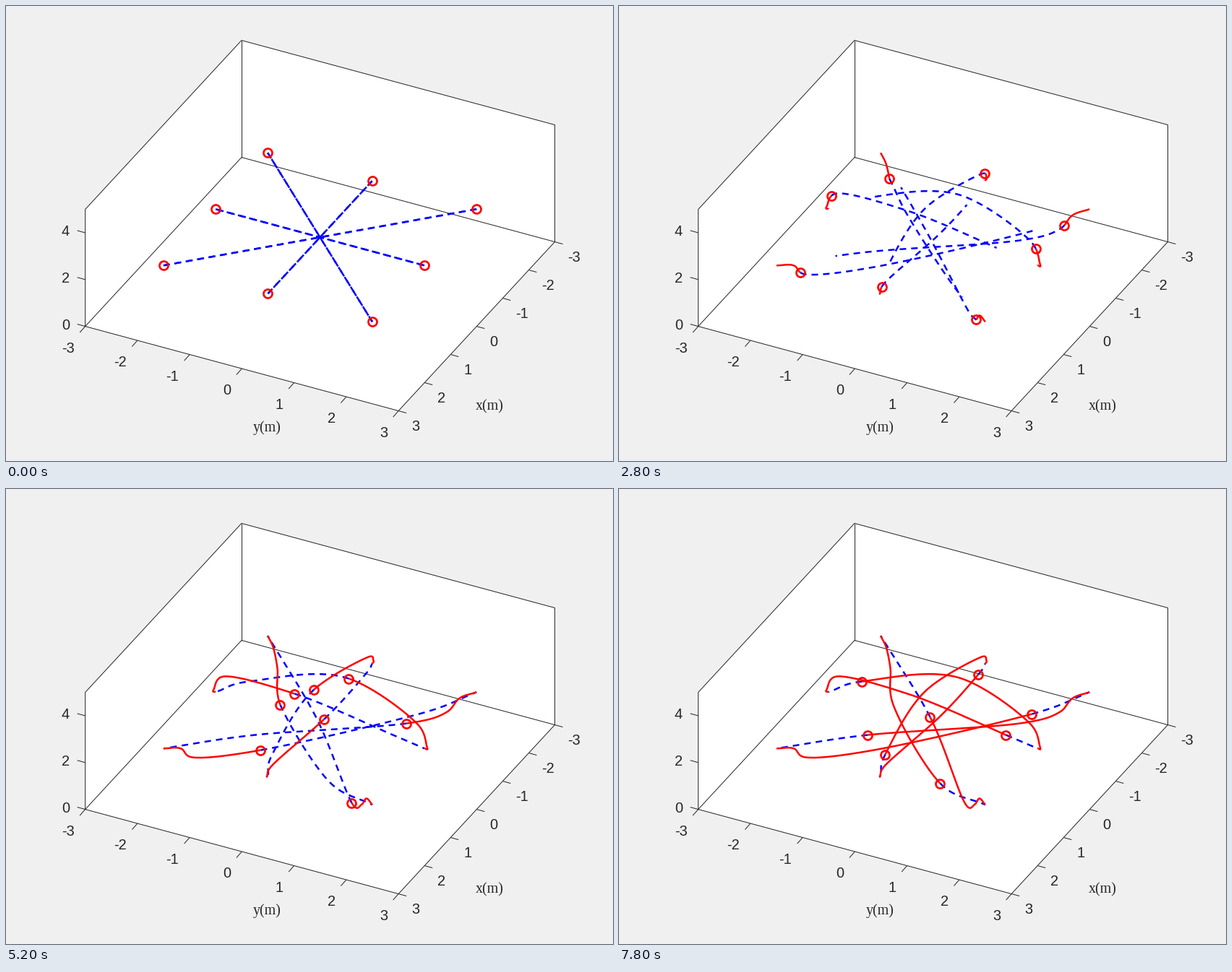
Write a matplotlib script that moves like this. It is 840x630 px and loops after 8 s.

```python
import numpy as np
import matplotlib.pyplot as plt
from matplotlib.animation import FuncAnimation

W, H, DPI = 840, 630, 100
PX = 72 / DPI                   # points per pixel
FRAMES, STEP_MS = 40, 200
TIMES = [0, 9, 16, 26, 39, 51]  # frames of start, four waypoints and goal
INK = "#262626"


def project(x, y, z):
    """Stage pixel of a point given in metres."""
    return (434.1 + 72.25 * y - 36.05 * x,
            384.5 + 19.5 * y + 39 * x - 32.4 * z)


def spline(t, pts, q):
    """Cubic Hermite curve through pts at times t, evaluated at q."""
    t, pts, q = (np.asarray(a, float) for a in (t, pts, q))
    m = np.gradient(pts, t, axis=0)
    i = np.clip(np.searchsorted(t, q, side="right") - 1, 0, len(t) - 2)
    h = (t[i + 1] - t[i])[:, None]
    s = (q - t[i])[:, None] / h
    return ((1 + 2 * s) * (1 - s) ** 2 * pts[i] + s * (1 - s) ** 2 * h * m[i]
            + s * s * (3 - 2 * s) * pts[i + 1] + s * s * (s - 1) * h * m[i + 1])


class Agent:
    """Crosses from its start to the opposite point, swerving on the way."""

    def __init__(self, x, y, settle, *waypoints):
        self.settle = settle    # frame at which the plan stops changing
        self.path = [project(x, y, 2), *waypoints, project(-x, -y, 2)]

    def at(self, q):
        return spline(TIMES, self.path, q)

    def trail(self, f):
        return self.at(np.linspace(0, f, 4 * f + 1))

    def plan(self, f):
        """Path ahead: a straight line at first, later the real course."""
        ahead = self.at(np.linspace(f, TIMES[-1], 150))
        dist = np.r_[0, np.cumsum(np.hypot(*np.diff(ahead, axis=0).T))]
        u = (dist / dist[-1])[:, None]
        straight = ahead[0] + (ahead[-1] - ahead[0]) * u
        swerve = min(1, (f / self.settle) ** 2)
        reach = 1 - 0.2 * np.sin(np.pi * min(1, f / 26))
        mix = straight + (ahead - straight) * swerve
        return mix[u[:, 0] <= reach]


agents = [
    Agent(-2, -2, 28, (370, 221), (375, 247), (379, 298), (444, 407)),
    Agent(-2, 0, 14, (508, 237), (501, 232), (426, 277), (368, 367)),
    Agent(-2, 2, 14, (626, 290), (610, 308), (554, 324), (344, 340)),
    Agent(0, 2, 14, (582, 356), (569, 325), (474, 262), (336, 266)),
    Agent(2, 2, 28, (498, 428), (492, 436), (478, 434), (430, 315)),
    Agent(2, 0, 14, (361, 396), (368, 382), (440, 318), (497, 256)),
    Agent(2, -2, 14, (242, 359), (258, 371), (352, 361), (571, 311)),
    Agent(0, -2, 14, (287, 277), (301, 259), (399, 283), (535, 340)),
]

fig = plt.figure(figsize=(W / DPI, H / DPI), dpi=DPI, facecolor="#f0f0f0")
ax = fig.add_axes([0, 0, 1, 1])
# Just off half a pixel, so that snapping never meets a tie
ax.set(xlim=(-0.45, W - 0.45), ylim=(H - 0.55, -0.55))
ax.axis("off")


def line(*pts):
    ax.plot(*zip(*pts), color=INK, lw=PX, zorder=2, solid_capstyle="butt")


def label(x, y, s, ha, font="Liberation Sans"):
    ax.text(x, y, s, ha=ha, va="baseline", family=font, size=20 * PX, color=INK)


left, front, right, back = (project(x, y, 0) for x, y in
                            [(3, -3), (3, 3), (-3, 3), (-3, -3)])
left_top, back_top, right_top = (project(x, y, 5) for x, y in
                                 [(3, -3), (-3, -3), (-3, 3)])
ax.fill(*zip(left, front, right, right_top, back_top, left_top),
        color="white", lw=0, zorder=1)
line(left, front, right, back, left, left_top, back_top, right_top, right)
line(back, back_top)

for v in range(-3, 4):
    x, y = project(3, v, 0)
    line((x, y), (x - 7.5, y + 8.5))
    label(x - 15, y + 36, str(v), "right")
    x, y = project(v, 3, 0)
    line((x, y), (x + 11, y + 3))
    label(x + 18, y + 27, str(v), "left")
for v in (0, 2, 4):
    x, y = project(3, -3, v)
    line((x, y), (x - 11, y - 3))
    label(x - 21.5, y + 4, str(v), "right")
label(668.5, 559, "x(m)", "center", "Liberation Serif")
label(361, 588, "y(m)", "center", "Liberation Serif")

LW = 2.5
plan_lines = [ax.plot([], [], color="blue", lw=LW * PX, zorder=3,
                      ls=(0, (9 / LW, 7 / LW)), dash_capstyle="butt")[0]
              for _ in agents]
trail_lines = [ax.plot([], [], color="red", lw=LW * PX, zorder=4,
                       solid_capstyle="butt", solid_joinstyle="round")[0]
               for _ in agents]
rings, = ax.plot([], [], "o", ms=12 * PX, mfc="none", mec="red",
                 mew=2.7 * PX, zorder=5)


def draw(f):
    for agent, plan, trail in zip(agents, plan_lines, trail_lines):
        plan.set_data(*agent.plan(f).T)
        trail.set_data(*agent.trail(f).T)
    rings.set_data(*np.array([a.at([f])[0] for a in agents]).T)
    return [*plan_lines, *trail_lines, rings]


anim = FuncAnimation(fig, draw, frames=FRAMES, interval=STEP_MS,
                     repeat=True, repeat_delay=0, blit=False)
plt.show()
```
